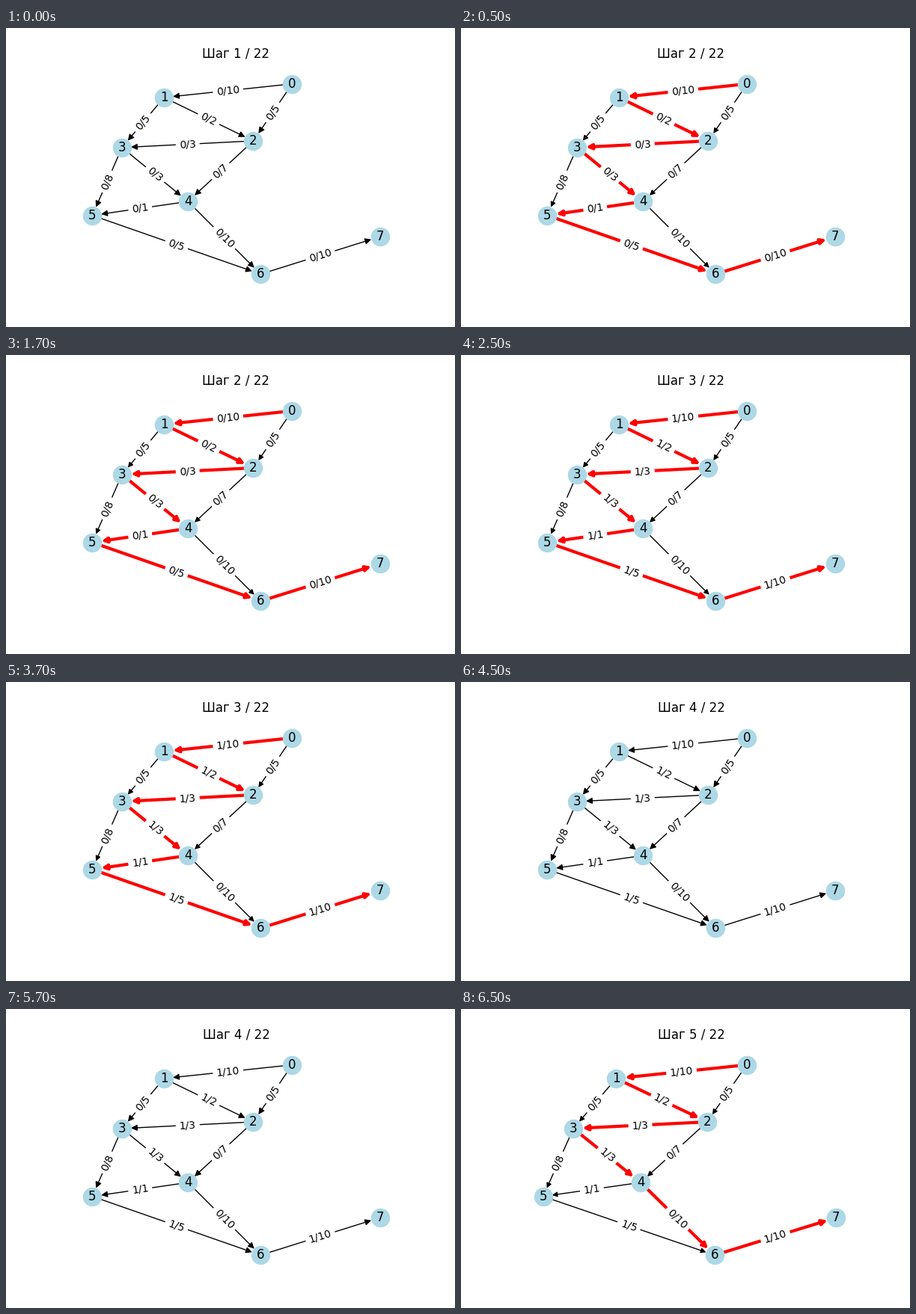
A matplotlib script that plays this animation: 600x400 px, repeating every 8 s.

```python
import numpy as np
import matplotlib.pyplot as plt
from matplotlib.animation import FuncAnimation
from matplotlib.patches import FancyArrowPatch

TOTAL_STEPS = 22
NODE_SIZE = 300

# Node positions, y pointing down
NODES = np.array([
    (382.4, 74.7), (211.1, 92.9), (330.5, 151), (155, 159.9),
    (243.2, 232.1), (115.35, 250.7), (340.3, 329.3), (499.65, 279.2),
])


def path_edges(nodes):
    return list(zip(nodes, nodes[1:]))


# Every node leads to the next one, and the first five also skip one ahead
CHAIN = path_edges(range(8))
SKIPS = [(node, node + 2) for node in range(5)]
CAPACITY = dict(zip(CHAIN + SKIPS, [10, 2, 3, 3, 1, 5, 10, 5, 5, 7, 8, 10]))
PATHS = [CHAIN, path_edges([node for node in range(8) if node != 5])]

fig, ax = plt.subplots(figsize=(6, 4), dpi=100)


def state_at(step):
    """Each path takes three steps: found, flow raised, highlight cleared."""
    index, phase = divmod(step - 2, 3)
    highlighted = PATHS[index] if index >= 0 and phase < 2 else []
    raised = PATHS[:max(0, step // 3)]
    flow = {edge: sum(edge in path for path in raised) for edge in CAPACITY}
    return highlighted, flow


def fit_view(edge_groups):
    """Pad each edge group by 5 %, then add a 5 % margin around them all."""
    lows, highs = [], []
    for group in edge_groups:
        points = NODES[np.array(group).ravel()]
        low, high = points.min(axis=0), points.max(axis=0)
        pad = 0.05 * (high - low)
        lows.append(low - pad)
        highs.append(high + pad)
    low, high = np.min(lows, axis=0), np.max(highs, axis=0)
    margin = 0.05 * (high - low)
    low, high = low - margin, high + margin
    ax.set_xlim(low[0], high[0])
    ax.set_ylim(high[1], low[1])


def draw_edge(edge, color, width, head):
    radius = np.sqrt(NODE_SIZE) / 2
    ax.add_patch(FancyArrowPatch(
        *NODES[list(edge)], arrowstyle="-|>", mutation_scale=head,
        shrinkA=radius, shrinkB=radius, color=color, linewidth=width, zorder=1))


def draw_edge_label(edge, text):
    start, end = NODES[list(edge)]
    dx, dy = ax.transData.transform(end) - ax.transData.transform(start)
    angle = (np.degrees(np.arctan2(dy, dx)) + 90) % 180 - 90
    ax.text(*(start + end) / 2, text, size=10, rotation=angle,
            ha="center", va="center", zorder=1,
            bbox=dict(boxstyle="round", ec="white", fc="white"))


def draw(frame):
    step = (frame + 3) // 4 + 1
    red, flow = state_at(step)
    black = [edge for edge in CAPACITY if edge not in red]
    head = 10 if red else 12
    ax.clear()
    ax.axis("off")
    fit_view([group for group in (black, red) if group])

    for edge in black:
        draw_edge(edge, "black", 1, head)
    for edge in red:
        draw_edge(edge, "red", 3, head)
    for edge, capacity in CAPACITY.items():
        draw_edge_label(edge, f"{flow[edge]}/{capacity}")

    ax.scatter(*NODES.T, s=NODE_SIZE, c="lightblue", linewidths=1, zorder=2)
    for node, (x, y) in enumerate(NODES):
        ax.text(x, y, str(node), size=12, ha="center", va="center", zorder=3)
    ax.set_title(f"Шаг {step} / {TOTAL_STEPS}", fontsize=12)


animation = FuncAnimation(fig, draw, frames=16, interval=500,
                          init_func=lambda: None, repeat=True, repeat_delay=0)
plt.show()
```
